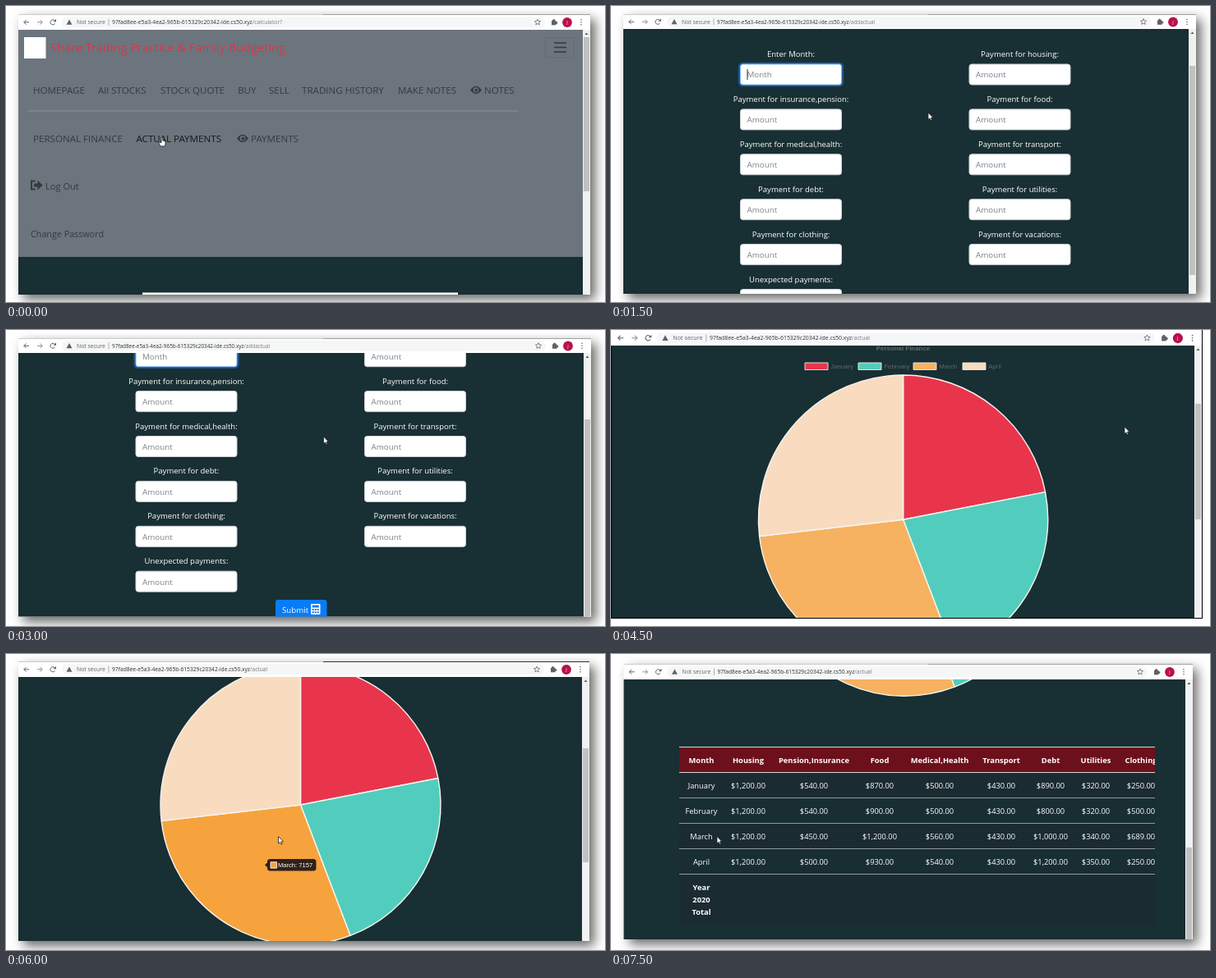
Animation of 729 by 361 pixels, one loop 8 s. Source, as an HTML page with a canvas:

```html
<!DOCTYPE html>
<html lang="en">
<head>
<meta charset="utf-8">
<title>Budget walkthrough</title>
<style>
html, body { margin: 0; width: 100%; height: 100%; overflow: hidden; background: #fff; }
canvas { display: block; width: 100vw; height: 100vh; }
</style>
</head>
<body>
<canvas id="stage" width="729" height="361"></canvas>
<script>
const c = document.getElementById('stage').getContext('2d');
const SANS = '"Open Sans", "Noto Sans", sans-serif';
const ARIAL = '"Liberation Sans", Arial, sans-serif';
const TEAL_DARK = '#182f33';
const RED = '#e8354c', TEAL = '#52cdbd', ORANGE = '#f6b261', PEACH = '#f9dcbf';

function rect(x, y, w, h, fill) {
  c.fillStyle = fill;
  c.fillRect(x, y, w, h);
}

function round(x, y, w, h, r, fill, stroke, width = 1) {
  c.beginPath();
  c.roundRect(x, y, w, h, r);
  if (fill) { c.fillStyle = fill; c.fill(); }
  if (stroke) { c.strokeStyle = stroke; c.lineWidth = width; c.stroke(); }
}

function path(points, stroke, width = 1) {
  c.beginPath();
  for (const [x, y] of points) c.lineTo(x, y);
  c.strokeStyle = stroke;
  c.lineWidth = width;
  c.stroke();
}

function shape(points, fill, stroke) {
  c.beginPath();
  for (const [x, y] of points) c.lineTo(x, y);
  c.closePath();
  c.fillStyle = fill;
  c.fill();
  if (stroke) { c.strokeStyle = stroke; c.lineWidth = 0.8; c.stroke(); }
}

function disc(x, y, r, fill) {
  c.beginPath();
  c.arc(x, y, r, 0, 7);
  c.fillStyle = fill;
  c.fill();
}

function text(str, x, y, size, fill, { align = 'left', weight = 400, family = SANS } = {}) {
  c.font = `${weight} ${size}px ${family}`;
  c.textAlign = align;
  c.fillStyle = fill;
  c.fillText(str, x, y);
}

function at(x, y, scale, draw) {
  c.save();
  c.translate(x, y);
  c.scale(scale, scale);
  draw();
  c.restore();
}

function arrowCursor(x, y) {
  at(x, y, 1, () => shape(
    [[0, 0], [0, 8.6], [2, 6.9], [3.4, 9.6], [4.7, 9], [3.4, 6.3], [5.8, 6.1]], '#fff', '#222'));
}

function handCursor(x, y) {
  at(x, y, 1, () => shape(
    [[-1, -5], [0.5, -5], [0.8, -1], [4, 0], [4, 4], [3, 6], [-2, 6], [-4, 2], [-3, 1], [-1, 2]], '#fff', '#222'));
}

// Browser toolbar, scroll bar and the shadowed card behind them.
function chrome(w) {
  const { left, right, top, bar, bottom, zoom = 1, fullScreen } = w;
  c.save();
  if (!fullScreen) {
    c.shadowColor = 'rgba(0,0,0,.6)';
    c.shadowBlur = 13;
    c.shadowOffsetX = c.shadowOffsetY = 6;
  }
  rect(left, top, right - left, bottom - top, '#fff');
  c.restore();
  if (!fullScreen) {
    rect(left, top, right - left, 1, '#ccc');
    rect(386, top, right - 386, 1, w.edge || '#a0a0a0');
  }

  const mid = (top + bar) / 2 + 0.3, ink = '#5f6368';
  round(left + 53 * zoom, mid - 6.5, right - left - 108 * zoom, 13, 6.5, '#f5f6f7');
  at(left + (fullScreen ? 1.5 : 0), mid, zoom, () => {
    for (const [x, dir, color] of [[10, 1, ink], [26, -1, '#8d9094']]) {
      path([[x - 3.2, 0], [x + 3.2, 0]], color);
      path([[x - dir * 0.4, -2.8], [x - dir * 3.2, 0], [x - dir * 0.4, 2.8]], color);
    }
    c.beginPath();
    c.arc(42, 0, 3, 0.5, 5.6);
    c.strokeStyle = ink;
    c.stroke();
    shape([[42.5, -0.6], [46, -0.6], [46, -4]], ink);
    shape([[58.5, 3], [65.5, 3], [62, -3.4]], ink);
    text('Not secure', 71, 2.4, 6.9, ink);
    rect(109.6, -4, 0.8, 8, '#9a9da0');
  });
  const host = '97fad8ee-e5a3-4ea2-965b-615329c20342-ide.cs50.xyz';
  const urlX = left + (fullScreen ? 120 : 114);
  text(host, urlX, mid + 2.4, w.urlSize, '#303235');
  text('/' + w.page, urlX + c.measureText(host).width, mid + 2.4, w.urlSize, '#777a7e');

  at(right, mid, zoom, () => {
    const star = Array.from({ length: 10 }, (_, i) => {
      const r = i % 2 ? 1.7 : 3.7, a = i * Math.PI / 5;
      return [-64 + r * Math.sin(a), -r * Math.cos(a)];
    });
    shape(star, '#fff', ink);
    rect(-47, -2, 5.5, 5.5, ink);
    disc(-44.4, -2.4, 1.5, ink);
    disc(-41.2, 0.6, 1.5, ink);
    disc(-28, 0.2, 5.9, '#b8104c');
    text('J', -28, 2.2, 5.5, '#fff', { align: 'center' });
    for (const y of [-3, 0, 3]) disc(-11, y, 0.8, ink);
  });

  rect(left, bar, right - left - 9, bottom - bar, TEAL_DARK);
  rect(right - 9, bar, 9, bottom - bar, '#f1f1f1');
  shape([[right - 6.5, bar + 6], [right - 2.5, bar + 6], [right - 4.5, bar + 3.6]], '#555');
  rect(right - 8, w.thumb[0], 7, w.thumb[1] - w.thumb[0], '#c1c1c1');
  if (fullScreen) {
    rect(right, top, 1, bottom - top, '#000');
    rect(left, bottom, right - left + 1, 1, '#000');
  }
  c.beginPath();
  c.rect(left, bar, right - left - 9, bottom - bar);
  c.clip();
}

function eye(x, y, fill) {
  c.beginPath();
  c.moveTo(x - 7, y);
  c.quadraticCurveTo(x, y - 9.5, x + 7, y);
  c.quadraticCurveTo(x, y + 9.5, x - 7, y);
  c.fillStyle = fill;
  c.fill();
  disc(x, y, 3.3, '#6c757d');
  disc(x + 0.3, y + 0.2, 2, fill);
}

function menuPage() {
  const ink = '#353a3f';
  rect(15, 29, 687, 277, '#6c757d');
  rect(22, 38, 26.5, 26, '#fff');
  text('Share Trading Practice & Family Budgeting', 54, 55.5, 14.6, '#d9364b');
  round(656.5, 38.5, 35, 24.5, 3, null, '#626a72');
  for (const y of [45, 50.5, 56]) rect(667, y - 0.8, 15, 1.6, ink);

  const items = [['HOMEPAGE', 33], ['All STOCKS', 112], ['STOCK QUOTE', 188], ['BUY', 282], ['SELL', 320],
    ['TRADING HISTORY', 360], ['MAKE NOTES', 477], ['NOTES', 582]];
  for (const [label, x] of items) text(label, x, 107, 11.6, ink);
  eye(572, 102.5, ink);
  rect(26, 127.5, 598, 1, '#899197');
  text('PERSONAL FINANCE', 33, 165.5, 11.6, ink);
  text('ACTUAL PAYMENTS', 158.5, 165.5, 11.6, '#15181a');
  eye(288, 161.5, ink);
  text('PAYMENTS', 298, 165.5, 11.6, ink);

  path([[35.5, 213.5], [31, 213.5], [31, 223.5], [35.5, 223.5]], ink, 2);
  shape([[34, 216.5], [38.5, 216.5], [38.5, 212.5], [44.5, 218.5], [38.5, 224.5], [38.5, 220.5], [34, 220.5]], ink);
  text('Log Out', 48, 223.5, 11.1, ink);
  text('Change Password', 30, 282.3, 10.75, ink);
  rect(166, 349.5, 384, 3, '#fff');
  handCursor(190, 165);
}

function field(center, y, label, hint, focused) {
  text(label, center, y - 9, 9.5, '#fff', { align: 'center' });
  if (focused) round(center - 63, y - 1, 126, 27, 4, null, '#20558c', 2.4);
  round(center - 61.5, y, 123, 25, 3, '#fff', focused ? '#80bdff' : '#ced4da');
  text(hint, center - 53.5, y + 16.3, 9.8, '#7b838a');
}

function formPage(dx, scroll) {
  const columns = [
    [219, ['Enter Month:', 'Payment for insurance,pension:', 'Payment for medical,health:', 'Payment for debt:',
      'Payment for clothing:', 'Unexpected payments:']],
    [497.5, ['Payment for housing:', 'Payment for food:', 'Payment for transport:', 'Payment for utilities:',
      'Payment for vacations:']]];
  for (const [x, labels] of columns) {
    labels.forEach((label, i) => {
      const month = label === 'Enter Month:';
      field(x + dx, 71 + i * 54.9 - scroll, label, month ? 'Month' : 'Amount', month);
    });
  }
  if (!scroll) rect(165.5, 77, 1, 13, '#333');
  round(327.5 + dx, 380.3 - scroll, 62.5, 25, 3, '#087cf8');
  text('Submit', 335.5 + dx, 396.2 - scroll, 9.7, '#fff');
  at(370.5 + dx, 385.3 - scroll, 1, () => {
    round(0, 0, 11.5, 13, 1.3, '#fff');
    rect(1.7, 1.7, 8.1, 2.8, '#087cf8');
    for (let i = 0; i < 6; i++) rect(1.7 + i % 3 * 3, i < 3 ? 6 : 9.2, 2, 2, '#087cf8');
  });
  arrowCursor(386 + dx, 130);
}

function pie(x, y, r, march = ORANGE) {
  const slices = [[0, 79, RED], [79, 159.2, TEAL], [159.2, 263.4, march], [263.4, 360, PEACH]];
  const rad = deg => (deg - 90) * Math.PI / 180;
  for (const [from, to, fill] of slices) {
    c.beginPath();
    c.moveTo(x, y);
    c.arc(x, y, r, rad(from), rad(to));
    c.closePath();
    c.fillStyle = fill;
    c.fill();
    c.strokeStyle = '#f6f4f0';
    c.lineWidth = 1.4;
    c.lineJoin = 'bevel';
    c.stroke();
  }
}

function chartPage() {
  text('Personal Finance', 355.5, 25, 7.9, '#666', { align: 'center', weight: 700, family: ARIAL });
  const legend = [['January', 236, RED], ['February', 301, TEAL], ['March', 368, ORANGE], ['April', 428, PEACH]];
  for (const [month, x, fill] of legend) {
    round(x, 40, 28, 8.5, 0, fill, '#f0eeea', 0.9);
    text(month, x + 31.3, 47, 7.8, '#666', { family: ARIAL });
  }
  pie(355.6, 231.2, 176.2);
  arrowCursor(625, 118);
  rect(0, 19, 1, 332, '#000');
}

function hoverPage() {
  pie(358.5, 184, 170.5, '#f6a33d');
  const dark = '#30211a';
  round(318, 250, 59.5, 14.5, 3.5, dark);
  shape([[318.5, 254], [315, 257.3], [318.5, 260.5]], dark);
  round(322, 253.7, 7.5, 7.5, 0, '#f6a33d', '#fff', 0.8);
  text('March: 7157', 331, 260, 7.6, '#fff', { family: ARIAL });
  arrowCursor(331.5, 222.5);
}

function tablePage() {
  pie(357.5, -119.7, 171);
  c.save();
  c.beginPath();
  c.rect(83, 100, 579, 240);
  c.clip();
  const centers = [110, 167, 247, 327, 400, 475, 535, 590, 645];
  const bold = { align: 'center', weight: 700 };
  const lineY = i => Math.round(112.8 + i * 31.1);
  rect(83, lineY(0), 579, 31, '#6c101c');
  ['Month', 'Housing', 'Pension,Insurance', 'Food', 'Medical,Health', 'Transport', 'Debt', 'Utilities', 'Clothing']
    .forEach((name, i) => text(name, centers[i], 132.5, 9.4, '#fff', bold));
  const rows = [
    ['January', 1200, 540, 870, 500, 430, 890, 320, 250],
    ['February', 1200, 540, 900, 500, 430, 800, 320, 500],
    ['March', 1200, 450, 1200, 560, 430, 1000, 340, 689],
    ['April', 1200, 500, 930, 540, 430, 1200, 350, 250]];
  rows.forEach((row, r) => {
    rect(83, lineY(r + 1), 579, 32, r % 2 ? '#192e33' : '#1a2b31');
    row.forEach((value, i) => {
      const label = i ? '$' + value.toLocaleString('en-US') + '.00' : value;
      text(label, centers[i], 163.8 + r * 31, 9.3, '#fff', { align: 'center' });
    });
  });
  rect(83, lineY(5), 579, 330 - lineY(5), '#1a2b31');
  ['Year', '2020', 'Total'].forEach((word, i) => text(word, 110, 288 + i * 15.2, 9.4, '#fff', bold));
  for (let i = 0; i < 6; i++) rect(83, lineY(i), 579, 1, i < 2 ? '#d3d8d9' : '#8d999b');
  c.restore();
  arrowCursor(129, 222.5);
}

const scenes = [
  { left: 15, right: 711, top: 10, bar: 29, bottom: 352, thumb: [38, 226], page: 'calculator?', urlSize: 6.8, draw: menuPage },
  { left: 15, right: 712, top: 10, bar: 28, bottom: 351, thumb: [73, 328], page: 'addactual', urlSize: 6.4,
    draw: () => formPage(0, 0) },
  { left: 15, right: 712, top: 10, bar: 28, bottom: 349.5, thumb: [109, 349.5], page: 'addactual', urlSize: 6.4,
    draw: () => formPage(0.5, 51.3) },
  { left: 0, right: 719, top: 0, bar: 19, bottom: 351, thumb: [90, 231], page: 'actual', urlSize: 6.9,
    zoom: 1.04, fullScreen: true, draw: chartPage },
  { left: 15, right: 710, top: 9, bar: 28, bottom: 350, thumb: [115, 254], page: 'actual', urlSize: 6.7,
    edge: '#333', draw: hoverPage },
  { left: 15.5, right: 708, top: 12, bar: 31, bottom: 348, thumb: [236, 348], page: 'actual', urlSize: 6.65, draw: tablePage }
];

function render(now) {
  const scene = scenes[Math.floor(now % 8000 / 1500)];
  rect(0, 0, 729, 361, '#fff');
  c.save();
  chrome(scene);
  scene.draw();
  c.restore();
  requestAnimationFrame(() => render(performance.now() - start));
}

const start = performance.now();
render(0);
</script>
</body>
</html>
```
